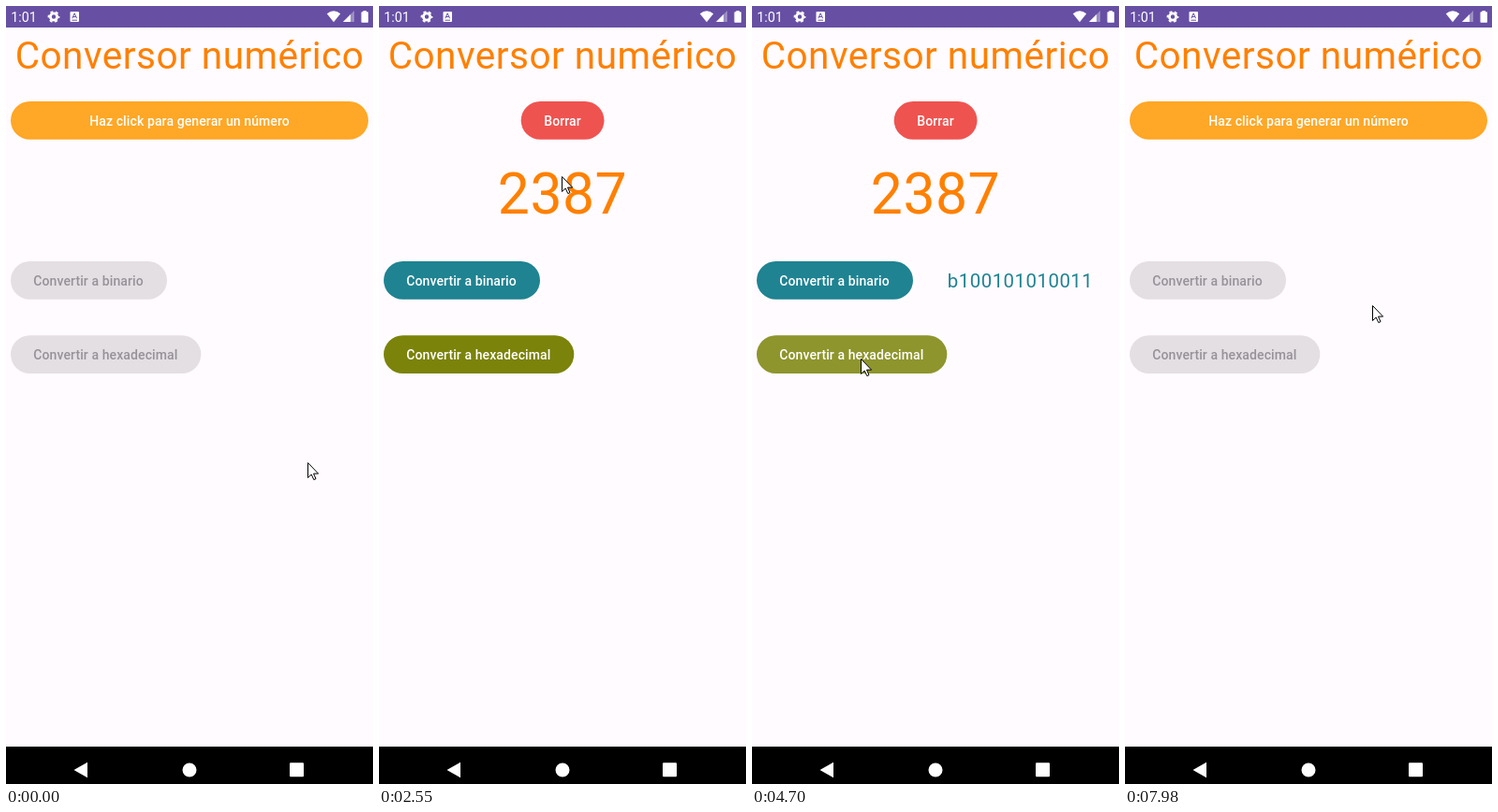
Write an HTML page that moves like this. It is 392 px wide and 832 px high and loops after 8 s.

```html
<!DOCTYPE html>
<html lang="es">
<head>
<meta charset="utf-8">
<title>Conversor numérico</title>
<style>
  html, body { margin: 0; width: 100%; height: 100%; overflow: hidden; background: #fffbff; }
  svg { display: block; width: 100vw; height: 100vh; font-family: Roboto, sans-serif; }
  .label { font-size: 14px; font-weight: 500; letter-spacing: .1px; }
  .body { letter-spacing: .5px; }
  .result { font-size: 20.4px; }
  .mid { text-anchor: middle; }
</style>
</head>
<body>
<svg viewBox="0 0 392 832">
  <rect width="392" height="832" fill="#fffbff"/>

  <!-- status bar -->
  <rect width="392" height="23" fill="#6750a4"/>
  <g fill="#fff">
    <text x="5.2" y="16.8" font-size="14.28">1:01</text>
    <g fill="none" stroke="#fff">
      <circle cx="51" cy="11.5" r="3.6" stroke-width="2.8"/>
      <circle cx="51" cy="11.5" r="5.5" stroke-width="1.8" stroke-dasharray="2.9 2.86" stroke-dashoffset="1.45"/>
    </g>
    <rect x="68.5" y="6" width="9.5" height="11" rx="1"/>
    <path d="M70.8 13.2 73.2 7.8 75.6 13.2M71.7 11.5H74.7M70.5 15.2H76" fill="none" stroke="#6750a4"/>
    <path d="M342.8 8.2Q350 2.4 357.2 8.2L350 17.2Z"/>
    <path d="M372 5V17H360Z" opacity=".35"/>
    <path d="M368 9V17H360Z"/>
    <path d="M381.5 6.2V5H385V6.2H386.2Q387 6.2 387 7V17Q387 17.8 386.2 17.8H380.3Q379.5 17.8 379.5 17V7Q379.5 6.2 380.3 6.2Z"/>
  </g>

  <text class="body mid" x="196" y="67" font-size="40.5" fill="#ff8000">Conversor numérico</text>
  <g id="buttons"></g>
  <text id="number" class="body mid" x="196" y="222" font-size="60.7" fill="#ff8000">2387</text>
  <text id="binary" class="body result" x="208.8" y="301.3" fill="#1f8391">b100101010011</text>
  <text id="hexa" class="body result" x="306" y="380.7" fill="#7b830a">0x953</text>

  <!-- navigation bar -->
  <rect y="792" width="392" height="40"/>
  <g fill="#fff">
    <path d="M72.5 817 87 808.8V825.2Z"/>
    <circle cx="196" cy="817" r="7.5"/>
    <rect x="303" y="809.3" width="15" height="15" rx="1"/>
  </g>

  <path id="cursor" d="M.5.5V16.5L4.2 13 6.8 18.6 9 17.6 6.5 12.1H11.6Z" fill="#fff" stroke="#000"/>
</svg>

<script>
const LOOP = 8000, FPS = 15.04;
const NS = 'http://www.w3.org/2000/svg';
const byId = id => document.getElementById(id);
const clamp = v => Math.max(0, Math.min(1, v));
const smooth = v => v * v * (3 - 2 * v);

function add(parent, tag, attrs) {
  const el = document.createElementNS(NS, tag);
  setAll(el, attrs);
  return parent.appendChild(el);
}

function setAll(el, attrs) {
  for (const key in attrs) el.setAttribute(key, attrs[key]);
}

function makeButton(name, x, y, width, text, centred) {
  const group = add(byId('buttons'), 'g', {});
  const shape = { x, y, width, height: 40.8, rx: 20.4 };
  const clip = add(group, 'clipPath', { id: 'clip-' + name });
  add(clip, 'rect', shape);
  const box = add(group, 'rect', shape);
  const clipped = add(group, 'g', { 'clip-path': `url(#clip-${name})` });
  const ripple = add(clipped, 'circle', { fill: '#fff', opacity: 0 });
  const label = add(group, 'text', {
    class: centred ? 'label mid' : 'label',
    x: centred ? 196 : x + 24.3,
    y: y + 25.7
  });
  label.textContent = text;
  return { group, box, ripple, label, width };
}

const generate = makeButton('generate', 5, 102, 382, 'Haz click para generar un número', true);
const erase = makeButton('erase', 151.7, 102, 88.8, 'Borrar', true);
const toBinary = makeButton('binary', 5, 273, 167, 'Convertir a binario');
const toHexa = makeButton('hexa', 5, 352.2, 203.3, 'Convertir a hexadecimal');

function paint(button, fill, ink) {
  button.box.setAttribute('fill', fill);
  button.label.setAttribute('fill', ink);
}
paint(generate, '#ffa726', '#fff');
paint(erase, '#ef5350', '#fff');

// Each hand movement is an eased quadratic curve; the pointer rests in between.
const home = [322, 488];
const moves = [
  { start: 30, end: 600, bend: [272, 262], to: [181, 128] },
  { start: 1470, end: 2340, bend: [56, 270], to: [254, 187] },
  { start: 2340, end: 2830, bend: [151, 151], to: [121, 285] },
  { start: 3230, end: 3800, bend: [240, 300], to: [366, 300] },
  { start: 3800, end: 4430, bend: [272, 289], to: [116, 377] },
  { start: 4960, end: 5180, bend: [220, 391], to: [325, 391] },
  { start: 5380, end: 5450, bend: [340, 390], to: [351, 385] },
  { start: 5450, end: 6330, bend: [390, 340], to: [184, 124] },
  { start: 7360, end: 7975, bend: [70, 410], to: [264, 320] }
];

function pointerAt(t) {
  let at = home;
  for (const { start, end, bend, to } of moves) {
    if (t < start) break;
    const u = smooth(clamp((t - start) / (end - start))), v = 1 - u;
    at = at.map((from, i) => v * v * from + 2 * u * v * bend[i] + u * u * to[i]);
  }
  return at.map(Math.round);
}

function ripple(button, t, start, end) {
  const [cx, cy] = pointerAt(start);
  const grow = clamp((t - start + 60) / 230);
  const fade = clamp((end - t) / 130);
  const r = button.width * (.25 + .85 * grow);
  setAll(button.ripple, { cx, cy, r, opacity: t < start ? 0 : .14 * fade });
}

const show = (el, on) => el.setAttribute('visibility', on ? 'visible' : 'hidden');

function draw(now) {
  const step = 1000 / FPS;
  const t = Math.floor((now % LOOP + 10) / step) * step;
  const filled = t >= 1180 && t < 6980;
  const ink = dim => !filled ? '#969298' : t < 1250 ? dim : '#fff';

  show(generate.group, !filled);
  show(erase.group, filled);
  show(byId('number'), filled);
  show(byId('binary'), filled && t >= 3190);
  show(byId('hexa'), filled && t >= 4790);

  paint(toBinary, filled ? '#1f8391' : '#e3dfe3', ink('#1e5c66'));
  paint(toHexa, filled ? '#7b830a' : '#e3dfe3', ink('#575c12'));

  ripple(generate, t, 925, 1330);
  ripple(toBinary, t, 3025, 3400);
  ripple(toHexa, t, 4625, 4930);
  ripple(erase, t, 6600, 7060);

  const [x, y] = pointerAt(t);
  byId('cursor').setAttribute('transform', `translate(${x} ${y})`);
}

const begin = performance.now();
function tick() {
  draw(performance.now() - begin);
  requestAnimationFrame(tick);
}
tick();
</script>
</body>
</html>
```
